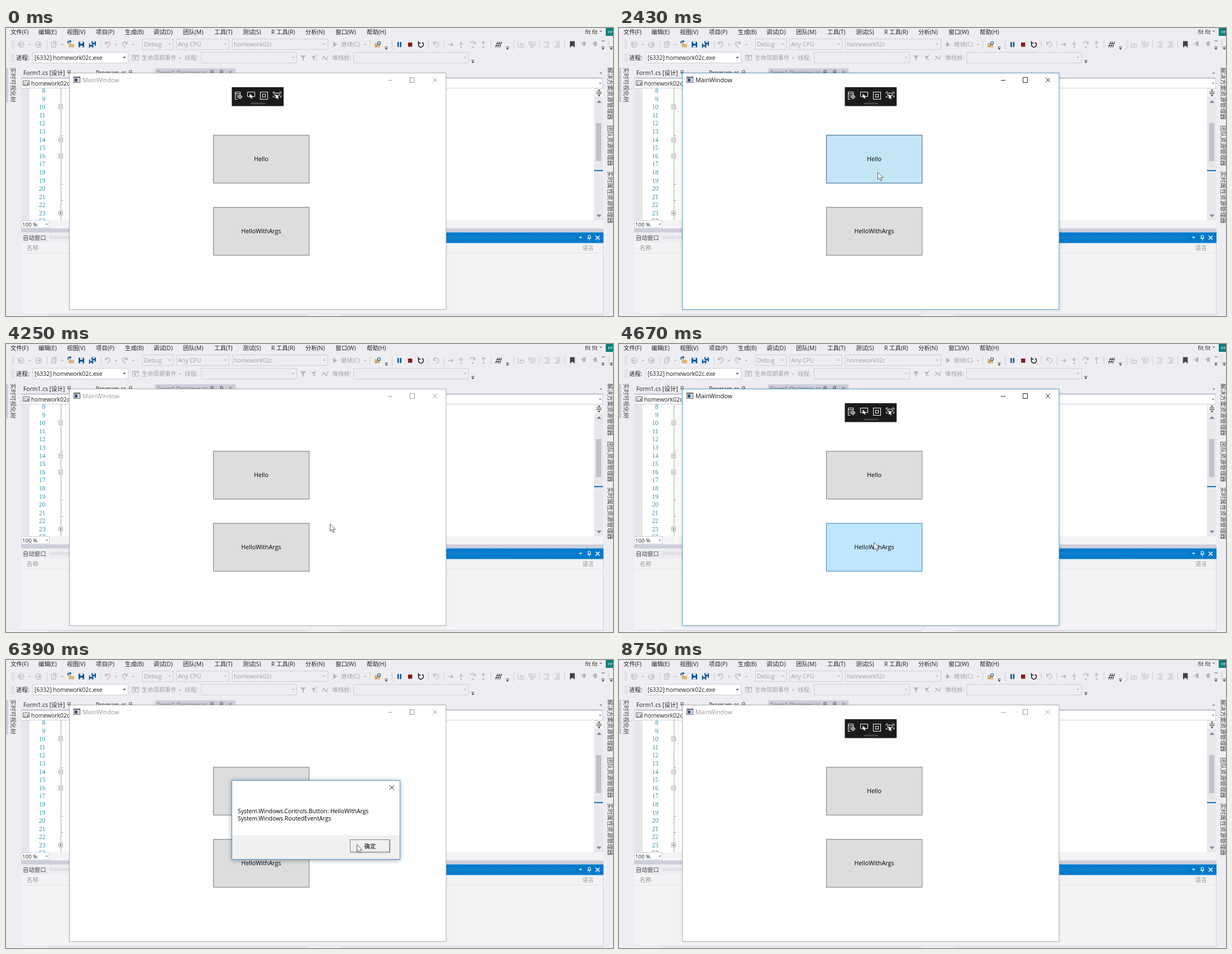
Write an HTML page that moves like this. It is 1087x515 px and loops after 8840 ms.

```html
<!DOCTYPE html>
<html lang="zh">
<head>
<meta charset="utf-8">
<title>MainWindow</title>
<style>
html, body { margin: 0; width: 100%; height: 100%; overflow: hidden; background: #eeeef2; }
svg { display: block; width: 1087px; height: 515px; }
text { font-family: "Open Sans", "Noto Sans CJK SC", "Noto Sans CJK", "Noto Sans", sans-serif; white-space: pre; }
.number { font-family: "Liberation Serif", serif; text-anchor: end; }
</style>
</head>
<body>
<svg id="stage" viewBox="0 0 1087 515" xmlns="http://www.w3.org/2000/svg"></svg>
<script>
const LOOP = 8840;
const INK = '#1e1e1e', DIM = '#a2a4a5', FAINT = '#b6b7bb', LINE = '#cccedb', BLUE = '#00539c', BG = '#eeeef2';

// Markup helpers
const rect = (x, y, w, h, fill, stroke, extra = '') =>
  `<rect x="${x}" y="${y}" width="${w}" height="${h}" fill="${fill}" stroke="${stroke || 'none'}" ${extra}/>`;
const text = (x, y, s, fill = INK, size = 10.4, extra = '') =>
  `<text x="${x}" y="${y}" fill="${fill}" font-size="${size}" ${extra}>${s}</text>`;
const line = (d, color, width = 1, extra = '') =>
  `<path d="${d}" fill="none" stroke="${color}" stroke-width="${width}" ${extra}/>`;
const shape = (d, fill, extra = '') => `<path d="${d}" fill="${fill}" ${extra}/>`;
const at = (x, y, s) => `<g transform="translate(${x} ${y})">${s}</g>`;
const caret = (x, y, c = '#717171', r = 2.5) => shape(`M${x - r} ${y - r / 2}h${2 * r}l${-r} ${r}z`, c);
const grip = (x, y) => rect(x, y, 5, 15, 'url(#dots)');
const divider = x => line(`M${x}.5 22v15`, LINE);
const overflow = (x, y) => line(`M${x - 2.5} ${y}h5`, INK) + caret(x, y + 3.5, INK);
const vertical = (x, y, s) => `<text transform="translate(${x} ${y}) rotate(90)" font-size="10.4" fill="#444">${s}</text>`;
const cross = (x, y, r, c, w = 1) => line(`M${x - r} ${y - r}l${2 * r} ${2 * r}m0 ${-2 * r}l${-2 * r} ${2 * r}`, c, w);
const combo = (x, y, w, s, fill = BG, color = DIM) =>
  rect(x + .5, y + .5, w, 19, fill, LINE) + text(x + 3, y + 14, s, color) + caret(x + w - 6, y + 10, color === DIM ? FAINT : INK);

function menuBar() {
  const items = [[8, '文件(F)'], [58, '编辑(E)'], [109, '视图(V)'], [161, '项目(P)'], [213, '生成(B)'],
    [264, '调试(D)'], [317, '团队(M)'], [373, '工具(T)'], [424, '测试(S)'], [475, 'R 工具(R)'],
    [536, '分析(N)'], [590, '窗口(W)'], [646, '帮助(H)']];
  return items.map(([x, s]) => text(x, 11, s)).join('') + text(1037, 10.5, 'fit fit') + caret(1065, 6) +
    rect(1074, 0, 13, 14, '#0b7f7c') + text(1078, 10, 'FF', '#fff', 8);
}

function mainToolbar() {
  const arrowCircle = (x, dir) => `<circle cx="${x}" cy="29.5" r="5" fill="none" stroke="${FAINT}" stroke-width="1.2"/>` +
    line(`M${x - 3 * dir} 29.5h${6 * dir}m${-2.5 * dir} -2.5l${2.5 * dir} 2.5l${-2.5 * dir} 2.5`, FAINT, 1.2);
  const disk = (x, y, r) => shape(`M${x - r} ${y - r}h${2 * r - 1}l1 1v${2 * r - 1}h${-2 * r}z`, BLUE) +
    rect(x - r / 2, y - r, r, r * .7, BG) + rect(x - r / 2, y + r * .4, r, r * .6, BG);
  const folder = x => shape(`M${x - 5} 27h4l1 1.5h5v6h-10z`, '#dcb67a');
  const turn = (x, dir) => line(`M${x - 4 * dir} 24v4h${4 * dir}m${-4 * dir} 0c${3 * dir} -5 ${9 * dir} -4 ${8 * dir} 1c0 2 ${-3 * dir} 4 ${-5 * dir} 6`, FAINT, 1.4);
  const step = (x, d) => `<circle cx="${x}" cy="34" r="1.6" fill="${FAINT}"/>` + line(`M${x} ${d}`, FAINT, 1.3);
  const rows = (x, y = 25) => line(`M${x - 5} ${y}h10m-6 3h6m-6 3h6m-10 3h10`, FAINT);
  const flag = (x, dir) => shape(`M${x - 1} 24h5v9l-2.5 -2l-2.5 2z`, FAINT) + line(`M${x - 5} 28h5m${dir < 0 ? -3 : -2} -2l${2 * dir} 2l${-2 * dir} 2`, FAINT);
  return grip(10, 22) + arrowCircle(27, -1) + caret(43, 30, FAINT) + arrowCircle(58, 1) + divider(73) +
    rect(81.5, 25.5, 7, 9, 'none', FAINT) + line('M84 23.5h6v8M83 28h4m-4 3h4', FAINT) + caret(101, 30, FAINT) +
    folder(117) + line('M111 28v-4h5m-2 -2l2.5 2l-2.5 2', BLUE, 1.4) + disk(135, 29.5, 5) + disk(157, 27.5, 4) + disk(152.5, 31.5, 3.8) +
    divider(170) + turn(182, 1) + caret(197, 30, FAINT) + turn(213, -1) + caret(228, 30, FAINT) +
    combo(244, 19, 55, 'Debug') + combo(305, 19, 94, 'Any CPU') + combo(405, 19, 171, 'homework02c') +
    shape('M586 24.5l7 5l-7 5z', FAINT) + text(600, 33, '继续(C)', DIM) + caret(643, 30, FAINT) + divider(651) +
    folder(665) + `<circle cx="668" cy="27" r="2.5" fill="${BG}" stroke="${BLUE}" stroke-width="1.2"/>` + line('M666 29l-4 5', '#b98a45', 1.5) +
    overflow(681, 34) + grip(689, 22) + rect(701, 25, 2.5, 9, BLUE) + rect(705.5, 25, 2.5, 9, BLUE) + rect(720, 26, 7.5, 7.5, '#8b1a1a') +
    line('M740 26.5a4.5 4.5 0 1 0 5 -.8M738.5 23.5v3.5h4', INK, 1.6) + divider(756) +
    line('M766 24v5h4m-4 0a4.5 4.5 0 1 1 4 5', FAINT, 1.3) + divider(784) +
    line('M792 29.5h8m-3 -3l3 3l-3 3', FAINT, 1.4) + step(815, '23v7m-3 -3l3 3l3 -3') + step(836, '30m-5 -2c1 -5 8 -5 9 0m0 -4v4h-4') + step(855, '31v-7m-3 3l3 -3l3 3') +
    divider(868) + line('M881 24l-4 11m7.500 -11l-4 11m7.500 -11l-4 11M878 27.500h9m-11 4h9', INK, .9) + overflow(898, 34) + grip(907, 22) +
    line('M917 25v9h10v-5h-7m3 -2l-3 2l3 2', FAINT) + rect(936.5, 24.5, 6, 4, 'none', FAINT) + line('M938 31h8m-8 3h8M947 24v8', FAINT) + divider(955) +
    rows(968) + rows(987) + line('M984 34l5 -5', FAINT) + divider(1000) + shape('M1010 23.5h8.5v11.5l-4.2 -3.5l-4.3 3.5z', '#424242') +
    flag(1034, -1) + flag(1054, 1) + line('M1067 22l2 2m1 -2l2 2', INK) + overflow(1069, 34) + grip(1077, 22) + overflow(1084, 34);
}

function processBar() {
  const funnel = (x, r) => shape(`M${x - r} ${54 - r}h${2 * r}l${-r + 1} ${r}v${r}l-2 -1.5v${-r + 1.5}z`, FAINT);
  return grip(10, 46) + text(18, 57, '进程:') + combo(48, 43, 170, '[6332] homework02c.exe', '#fff', INK) +
    rect(226.5, 48.5, 11, 9, 'none', FAINT) + line('M227 50.5h10M229 54h4m-2 -2l2 2l-2 2', FAINT, 1.4) +
    text(243, 57, '生命周期事件', DIM) + caret(312, 54, FAINT) + text(320, 57, '线程:', DIM) + combo(349, 43, 171, '') +
    funnel(532, 5) + funnel(551, 4) + line('M552 50l4 -2m-3 8l4 2', FAINT) + line('M566 57l4 -6l3 5l4 -7m-11 1l10 7', FAINT, 1.2) +
    text(584, 57, '堆栈帧:', DIM) + combo(622, 43, 206, '') + overflow(836, 58);
}

function editor() {
  const lineY = n => 112 + (n - 8) * 14.6;
  const number = (n, y) => text(70.5, y, n, '#2b91af', 11.5, 'class="number"');
  const pin = x => line(`M${x - 2} 76h4v4h-4zm-1 4h6m-3 0v3`, '#555');
  const numbers = [...Array(16).keys()].map(i => number(i + 8, lineY(i + 8) + 4)).join('');
  const fold = n => rect(94.5, Math.round(lineY(n)) - 3.5, 7, 7, '#fff', '#a5a5a5') +
    line(`M96 ${Math.round(lineY(n))}h4${n === 23 ? 'm-2 -2v4' : ''}`, '#555');
  return rect(267, 72, 144, 18, LINE) + text(31, 84, 'Form1.cs [设计]') + pin(113) + text(161, 84, 'Program.cs') + pin(223) +
    text(271, 84, 'Form1.Designer.cs', '#717171') + pin(369) + pin(386) + cross(402, 79, 3, '#717171') + caret(1065, 81) +
    rect(27, 88, 1042, 20, LINE) + rect(28, 91, 1040, 16, '#fff') +
    rect(30.5, 94.5, 11, 8, '#fff', '#555') + text(32, 102, 'C#', INK, 7) + text(45, 103, 'homework02c') + caret(1064, 99, '#555', 2) +
    rect(27, 108, 15, 236, '#e6e7e8') + rect(42, 108, 1011, 236, '#fff') +
    `<svg x="42" y="108" width="1011" height="236" viewBox="42 108 1011 236">${numbers}${number(57, 349)}</svg>` +
    line('M98.5 108v236m0 -151.5h4m-4 87h4m-4 29h4', '#a5a5a5') + line('M106.5 108v236', '#d0d0d0', 1, 'stroke-dasharray="2 3"') +
    [10, 14, 16, 23].map(fold).join('') +
    rect(1053, 108, 16, 236, '#e8e8ec') + rect(1054, 109, 15, 14, '#f5f5f5') +
    line('M1057.5 114.5h9m-9 3h9M1062 110v3m0 6v3m-2 -10l2 -2l2 2m-4 8l2 2l2 -2', INK) +
    shape('M1057.5 134l4.5 -5l4.5 5z', '#868999') + rect(1056.5, 170, 9.5, 68, '#c2c3c9') + rect(1053, 254, 16, 2, '#0e70c0') +
    shape('M1057.5 333.5l4.5 5l4.5 -5z', '#868999') +
    rect(27, 344, 1042, 14, '#f4f4f6') + rect(27.5, 344.5, 50, 13, '#fff', LINE) + text(29, 355, '100 %', INK, 9.8) + caret(73, 351, '#555', 2);
}

function toolPanes() {
  return rect(27, 358.5, 1043, 7, LINE) + text(30, 379, '自动窗口', '#444') + rect(77, 372, 36, 5, 'url(#dots)') +
    rect(27, 384, 1042, 128, '#f3f3f5') + line('M27 402.5h1042M27 511.5h515M549 511.5h520', '#e3e3e8') + text(37, 397, '名称', '#999') +
    rect(549, 365.5, 521, 19, '#007acc') + rect(788, 372, 232, 5, 'url(#lightDots)') + caret(1029, 375, '#fff', 3) +
    line('M1042.5 371h4v5h-4zm-1.5 5h7m-3.5 0v4', '#fff') + cross(1059.5, 375, 3.5, '#fff', 1.5) + text(1032, 397, '语言', '#999') +
    line('M1069.5 384v128', LINE) + rect(542, 384, 7, 131, BG) + rect(77, 512, 465, 3, '#dddde3') + rect(600, 512, 470, 3, '#dddde3') +
    rect(0, 514, 1087, 1, '#fafafa');
}

function sideStrips() {
  return rect(0, 71, 4, 62, LINE) + vertical(9, 70.5, '实时可视化树') +
    vertical(1078, 70.5, '解决方案资源管理器') + vertical(1078, 174, '团队资源管理器') + vertical(1078, 256, '实时属性资源管理器');
}

function debugStrip() {
  const pointer = (x, y) => shape(`M${x} ${y}v8l2 -2l1.5 3l1.5 -1l-1.5 -2.5h2.5z`, '#fff');
  return rect(404.4, 105.8, 92.8, 33.8, '#1b1b1c') + rect(438, 133.5, 26, 3, '#464646') +
    line('M410.5 114.5h9v4m-9 -4v13h4m-4 -10h9m-7 3h3m-3 3h2', '#fff') + '<circle cx="419" cy="123" r="3" fill="none" stroke="#fff"/>' + line('M419 118.5v9m-4.5 -4.5h9', '#fff', .8) +
    line('M436 122.5h-3.5v-8h13v8h-4', '#fff') + pointer(436.5, 117.5) +
    rect(455.5, 114.5, 13, 13, 'none', '#fff') + rect(459.5, 118.5, 5, 5, 'none', '#fff') +
    line('M478.5 117v-2.5h3m8 0h3v3m0 3v3h-2m-9 0h-3v-2M481 116.5h9v4h-9z', '#fff') + pointer(483, 118.5);
}

function dialog(id, x, y, w, h, lines) {
  const bx = w - 89, by = h - 35;
  const bevel = `M${bx + 1.5} ${by + 22}v-20.5h69`;
  const content = rect(.5, .5, w, h, '#fff') + rect(1, h - 43, w - 1, 43, '#f0f0f0') +
    lines.map((s, i) => text(11, 59 + i * 13, s, '#000', 10.4)).join('') +
    rect(bx + .5, by + .5, 71, 22.5, '#f0f0f0', '#747474') +
    `<g id="${id}Up">${line(bevel, '#fff')}${line(`M${bx + 2} ${by + 22}h68.5v-20`, '#a8a8a8')}</g>` +
    `<g id="${id}Down">${line(bevel, '#a0a0a0')}</g>` +
    `<text id="${id}Ok" x="${bx + 36}" y="${by + 16}" font-size="10.4" text-anchor="middle">确定</text>`;
  return `<g id="${id}">` + at(x, y, `<g mask="url(#${id}Outside)">${rect(0, 1, w + 1, h + 1, '#000', '', 'filter="url(#blur)" opacity=".38"')}</g>` +
    `<mask id="${id}Outside" maskUnits="userSpaceOnUse" x="-30" y="-30" width="${w + 60}" height="${h + 60}">${rect(-30, -30, w + 60, h + 60, '#fff')}${rect(0, 0, w, h, '#000')}</mask>` +
    rect(1, 1, w - 1, 25, '#fff') + `<g id="${id}Body">${content}</g>` +
    rect(.5, .5, w, h, 'none', '#4699da') + cross(w - 14, 13, 4.2, '#333')) + '</g>';
}

function mainWindow() {
  const button = (id, y, label) => rect(371.4, y + .7, 171.4, 85.6, '#ddd', '#7a7a7a', `id="${id}"`) +
    text(457, y + 47, label, '#000', 10.8, 'text-anchor="middle"');
  return rect(114, 82, 674, 421, '#000', '', 'id="shadow" filter="url(#blur)"') +
    rect(113.5, 80.5, 674.5, 423, '#fff', '#aaa', 'id="frame"') +
    rect(121.5, 87.5, 11, 10, '#fff', '#555') + rect(121, 87, 12, 2, '#555') + rect(123, 90, 5, 6, '#33557f') + rect(129, 90, 2, 6, '#bbb') +
    text(137, 97, 'MainWindow', '#999', 10.8, 'id="title"') +
    '<g id="chrome" stroke="#999" fill="none"><path d="M684 93.5h8M723.5 88.5h8v9h-8zM764 89l8 8m0 -8l-8 8"/></g>' +
    button('hello', 191, 'Hello') + button('helloArgs', 320, 'HelloWithArgs') + `<g id="strip">${debugStrip()}</g>`;
}

document.getElementById('stage').innerHTML = `<defs>
  <pattern id="dots" width="4" height="4" patternUnits="userSpaceOnUse"><path d="M0 0h1v1h-1zM2 2h1v1h-1z" fill="#999"/></pattern>
  <pattern id="lightDots" width="4" height="4" patternUnits="userSpaceOnUse"><path d="M0 0h1v1h-1zM2 2h1v1h-1z" fill="#59a8de"/></pattern>
  <filter id="blur" x="-30%" y="-30%" width="160%" height="160%"><feGaussianBlur stdDeviation="4"/></filter></defs>` +
  rect(0, 0, 1087, 515, BG) + menuBar() + mainToolbar() + processBar() + editor() + toolPanes() + sideStrips() + mainWindow() +
  dialog('plain', 498, 221, 112, 128, ['Hello World!']) +
  dialog('args', 404, 215, 301, 141, ['System.Windows.Controls.Button: HelloWithArgs', 'System.Windows.RoutedEventArgs']) +
  `<g id="cursor">${shape('M.5 0v13l3 -2.8l2.2 5l2.2 -1l-2.2 -4.8h4.3z', '#fff', 'stroke="#333" stroke-width=".8"')}</g>`;

const el = id => document.getElementById(id);
const show = (id, on) => el(id).setAttribute('visibility', on ? 'inherit' : 'hidden');
const paint = (id, attrs) => Object.entries(attrs).forEach(([k, v]) => el(id).setAttribute(k, v));

const linear = u => u, easeOut = u => 1 - (1 - u) ** 2, smooth = u => u * u * (3 - 2 * u);
// Pointer stops: time, x, y, easing used on the way there
const route = [[490, 773, 511], [1350, 500, 308, linear], [1380, 494, 299, linear], [1690, 463, 258, easeOut],
  [2950, 463, 258, linear], [3790, 580, 322, smooth], [4310, 580, 322, linear], [4770, 439, 359, smooth],
  [6020, 439, 359, linear], [6450, 638, 328, smooth], [7610, 638, 328, linear], [8140, 1004, 514, smooth]];

function pointerAt(t) {
  const i = route.findIndex(stop => stop[0] > t);
  if (i < 1) return null;
  const [t0, x0, y0] = route[i - 1], [t1, x1, y1, ease] = route[i];
  const u = ease((t - t0) / (t1 - t0));
  return { x: Math.round(x0 + (x1 - x0) * u), y: Math.round(y0 + (y1 - y0) * u) };
}

const plainBox = { id: 'plain', down: 2430, open: 2620, ready: 2670, ok: 3920, close: 4250 };
const argsBox = { id: 'args', down: 5230, open: 5460, ready: 5510, ok: 7190, close: 7560 };
const within = (t, a, b) => t >= a && t < b;

function drawButton(id, top, box, t, p, modal) {
  const over = p && !modal && p.x >= 371 && p.x < 543 && p.y >= top && p.y < top + 86;
  const [fill, stroke] = within(t, box.down, box.ready) ? ['#c4e5f6', '#2c628b'] : over ? ['#bee6fd', '#3c7fb1'] : ['#ddd', '#7a7a7a'];
  paint(id, { fill, stroke });
}

function drawDialog(box, t) {
  const ready = within(t, box.ready, box.close), pressed = within(t, box.ok, box.close);
  show(box.id, within(t, box.open, box.close));
  show(box.id + 'Body', ready);
  show(box.id + 'Up', ready && !pressed);
  show(box.id + 'Down', pressed);
  // "inherit" keeps nested parts hidden together with their dialog
  paint(box.id + 'Ok', { transform: pressed ? 'translate(1 1)' : '' });
}

function render(t) {
  const p = pointerAt(t), boxes = [plainBox, argsBox];
  const modal = boxes.some(b => within(t, b.open, b.close));
  const active = within(t, 2430, 2620) || within(t, 4310, 5460) || within(t, 7560, 8750);
  paint('frame', { stroke: active ? '#5b9bc9' : '#b0b0b0' });
  paint('shadow', { opacity: active ? .15 : .06 });
  paint('title', { fill: active ? '#111' : '#999' });
  paint('chrome', { stroke: active ? '#222' : '#999' });
  show('strip', !modal && !within(t, 4250, 4310));
  drawButton('hello', 191, plainBox, t, p, modal);
  drawButton('helloArgs', 320, argsBox, t, p, modal);
  boxes.forEach(b => drawDialog(b, t));
  show('cursor', p);
  if (p) paint('cursor', { transform: `translate(${p.x} ${p.y})` });
}

const start = performance.now();
function tick() {
  render((performance.now() - start) % LOOP);
  requestAnimationFrame(tick);
}
tick();
</script>
</body>
</html>
```
